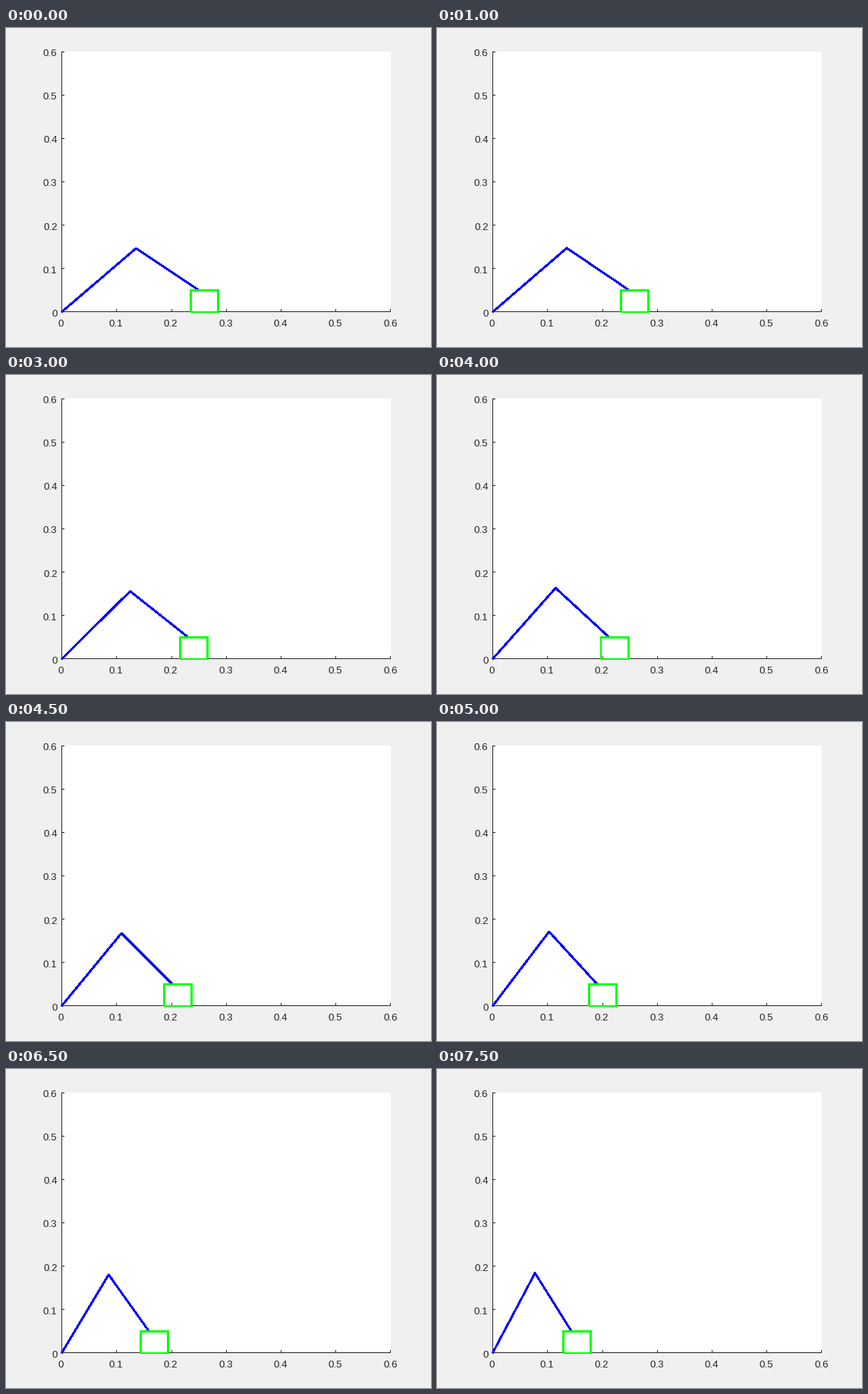
These frames come from a looping animation (560 by 420 pixels, 8000 ms). A matplotlib script:

```python
import numpy as np
import matplotlib.pyplot as plt
from matplotlib.animation import FuncAnimation
from matplotlib.patches import Rectangle

W, H, DPI = 560, 420, 100
PX = 72 / DPI                      # points per pixel
INK = "#262626"
LEFT, TOP, RIGHT, BASE = 73, 31, 507, 374
SCALE_X, SCALE_Y = 434 / 0.6, 342.3 / 0.6
TICK = 4

FRAMES, STEP_MS = 16, 500
MOVE_STEPS = 20                    # the full move takes 20 steps
X_START, X_END, GRIP_Y = 0.25, 0.1313, 0.05
LINK1, LINK2 = 0.2, 0.15
BOX, GRIP_OFFSET = 0.05, 0.015

plt.rcParams["font.family"] = "Liberation Sans"
fig = plt.figure(figsize=(W / DPI, H / DPI), dpi=DPI, facecolor="#f0f0f0")
ax = fig.add_axes([0, 0, 1, 1])
ax.set_xlim(0, W)
ax.set_ylim(H, 0)
ax.axis("off")


def fill(x, y, w, h, color):
    ax.add_patch(Rectangle((x, y), w, h, fc=color, lw=0, antialiased=False))


def label(x, y, value, align):
    ax.text(x, y, f"{value:.1f}" if value else "0", color=INK,
            fontsize=13.33 * PX, ha=align, va="baseline")


def stroke(color, z):
    # without antialiasing every touched pixel is filled, so the pen is thin
    line, = ax.plot([], [], color=color, lw=1.68 * PX, zorder=z,
                    antialiased=False, snap=False, clip_on=False,
                    solid_joinstyle="round", solid_capstyle="butt")
    return line


def to_px(x, y):
    return 73.3 + SCALE_X * np.asarray(x), 373.9 - SCALE_Y * np.asarray(y)


def draw_axes():
    fill(LEFT, TOP, RIGHT - LEFT, BASE - TOP, "white")
    fill(LEFT, TOP, 1, BASE - TOP, INK)
    fill(LEFT, BASE - 1, RIGHT - LEFT, 1, INK)
    for k in range(7):
        fill(round(73.2 + 72.2 * k), BASE - TICK, 1, TICK, INK)
        fill(LEFT, int(373.8 - 57.05 * k), TICK, 1, INK)
        label(round(72.4 + 72.37 * k), 393, k / 10, "center")
        label(67.5, round(379.8 - 57.13 * k), k / 10, "right")


def min_jerk(u):
    return u**3 * (10 - 15 * u + 6 * u * u)


def elbow(x, y):
    """Elbow-up solution of the two-link arm."""
    d2 = x * x + y * y
    bend = np.arccos((LINK1**2 + d2 - LINK2**2) / (2 * LINK1 * np.sqrt(d2)))
    q = np.arctan2(y, x) + bend
    return LINK1 * np.cos(q), LINK1 * np.sin(q)


draw_axes()
arm = stroke("#0000ff", 3)
crate = stroke("#00ff00", 4)


def update(i):
    x = X_START + (X_END - X_START) * min_jerk(i / MOVE_STEPS)
    ex, ey = elbow(x, GRIP_Y)
    arm.set_data(*to_px([0, ex, x], [0, ey, GRIP_Y]))
    a = x - GRIP_OFFSET
    b = a + BOX
    crate.set_data(*to_px([a, b, b, a, a], [0, 0, BOX, BOX, 0]))
    return arm, crate


anim = FuncAnimation(fig, update, frames=FRAMES, interval=STEP_MS,
                     repeat=True, repeat_delay=0)
plt.show()
```
